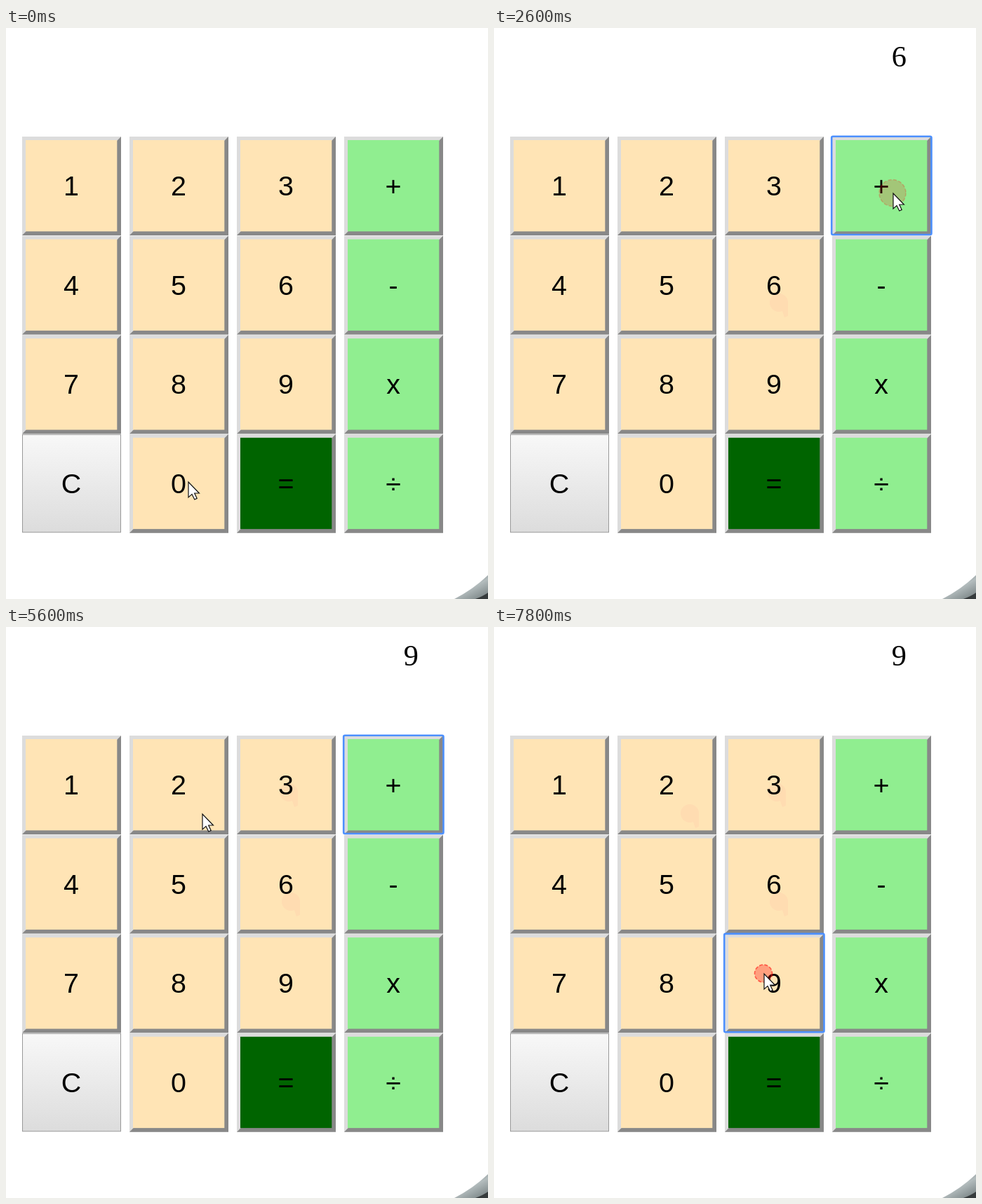
Write an HTML page that moves like this. It is 687 by 815 pixels and loops after 8 s.

```html
<!DOCTYPE html>
<html lang="en">
<head>
<meta charset="utf-8">
<title>Calculator</title>
<style>
  html, body { margin: 0; width: 100%; height: 100%; overflow: hidden; background: #fff; }
  svg { display: block; width: 100vw; height: 100vh; }
  .key { font: 39.4px "Liberation Sans", Arial, sans-serif; text-anchor: middle; }
  #display { font: 42.4px "Liberation Serif", "Times New Roman", serif; text-anchor: end; }
  #traces { mix-blend-mode: multiply; }
</style>
</head>
<body>
<svg viewBox="0 0 687 815">
  <defs>
    <linearGradient id="grey" x2="0" y2="1">
      <stop offset="0" stop-color="#f8f8f8"/>
      <stop offset="1" stop-color="#dcdcdc"/>
    </linearGradient>
    <linearGradient id="metal" x1=".2" y1=".2" x2=".8" y2="1">
      <stop offset="0" stop-color="#7f8a8b"/>
      <stop offset=".45" stop-color="#b3bcbd"/>
      <stop offset="1" stop-color="#7c8687"/>
    </linearGradient>
  </defs>
  <rect width="687" height="815" fill="#fff"/>
  <path d="M639 815Q666 801 687 781V815Z" fill="url(#metal)"/>
  <path d="M669 815Q680 811 687 806V815Z" fill="#363b3c"/>
  <g id="keys"></g>
  <g id="traces" fill="#fff6fa"></g>
  <rect id="ring" width="142.3" height="140.3" rx="2" fill="none" stroke="#4d90fe" stroke-width="2.6"/>
  <text id="display" x="588" y="54.5"></text>
  <circle id="pulse" fill="#f00" stroke="#f00" stroke-width="1.6" stroke-dasharray="5 2.5"/>
  <path id="cursor" d="M1 1V23L6 18.4L9.8 26L13.2 24.4L9.7 17H16.4Z" fill="#fff" stroke="#111" stroke-width="1.2"/>
</svg>
<script>
const STEP = 200, STEPS = 40;
const $ = id => document.getElementById(id);
const labels = '123+456-789xC0=÷';
const keyAt = i => ({ x: 23 + (i % 4) * 153, y: 155 + (i >> 2) * 141.6 });

function keyMarkup(label, i) {
  const { x, y } = keyAt(i), size = 141, light = 5, dark = 5.7;
  const inner = size - light - dark;
  const fill = label === '=' ? '#006400' : i % 4 === 3 ? '#90ee90' : '#ffe4b5';
  const face = label === 'C'
    ? `<rect x="${x + .5}" y="${y + .5}" width="140" height="139.5" fill="url(#grey)" stroke="#999"/>`
    : `<rect x="${x}" y="${y}" width="${size}" height="${size}" fill="#dcdcdc"/>
       <path d="M${x + size} ${y}v${size}h${-size}l${dark} ${-dark}L${x + size - dark} ${y + dark}Z" fill="#888"/>
       <rect x="${x + light}" y="${y + light}" width="${inner}" height="${inner}" fill="${fill}"/>`;
  return `${face}<text class="key" x="${x + 70}" y="${y + 84}">${label}</text>`;
}

// The hand rests at x, y from step `from` to step `to` and clicks at step `at`;
// `sag` bends the way there downwards.
const rests = [
  { from: 0, to: 0, x: 259, y: 647 },
  { from: 6, at: 7, to: 6, x: 406, y: 392, key: '6' },
  { from: 11, at: 12, to: 13, x: 568, y: 235, key: '+', sag: 8 },
  { from: 17, at: 18, to: 18, x: 403, y: 236, key: '3' },
  { from: 22, at: 24, to: 24, x: 575, y: 253, key: '+', sag: 78 },
  { from: 28, at: 30, to: 30, x: 279, y: 266, key: '2', sag: 95 },
  { from: 32, at: 33, to: 35, x: 521, y: 260, key: '+', sag: 40 },
  { from: 38, at: 39, to: 39, x: 384, y: 494, key: '9', sag: 110 }
];

// Digits show themselves, plus shows the running sum
const clicks = rests.filter(r => r.key);
let sum = 0;
for (const c of clicks) {
  if (c.key !== '+') sum += +c.key;
  c.value = c.key === '+' ? sum : c.key;
}

const ease = k => k * k * k * (10 - 15 * k + 6 * k * k);

function pointer(n) {
  const i = rests.findIndex(r => n <= r.to);
  const b = rests[i];
  if (n >= b.from) return b;
  const a = rests[i - 1], k = (n - a.to) / (b.from - a.to), e = ease(k);
  return {
    x: a.x + (b.x - a.x) * e,
    y: a.y + (b.y - a.y) * e + (b.sag || 0) * 4 * k * (1 - k)
  };
}

const show = (el, on) => el.setAttribute('visibility', on ? 'visible' : 'hidden');
const set = (el, attrs) => Object.entries(attrs).forEach(([k, v]) => el.setAttribute(k, v));

$('keys').innerHTML = [...labels].map(keyMarkup).join('');

// Clicks on digits leave a faint stain
const stained = clicks.filter(c => c.key !== '+');
$('traces').innerHTML = stained.map(c =>
  `<path transform="translate(${c.x} ${c.y})" d="M-13 0A13 13 0 0 1 13 0V19L8 21L5 12A13 13 0 0 1-13 0Z"/>`
).join('');

function draw(n) {
  const { x, y } = pointer(n);
  set($('cursor'), { transform: `translate(${x} ${y})` });

  const focus = clicks.filter(c => c.at - 1 <= n).pop();
  show($('ring'), focus);
  if (focus) {
    const p = keyAt(labels.indexOf(focus.key));
    set($('ring'), { x: p.x - .8, y: p.y - .3 });
  }

  const last = clicks.filter(c => c.at <= n).pop();
  $('display').textContent = last ? last.value : '';

  const age = last ? n - last.at : 2;
  show($('pulse'), age < 2);
  if (age < 2) {
    set($('pulse'), {
      cx: last.x, cy: last.y + .5, r: 12.5 + 6.5 * age,
      'fill-opacity': .3 - .13 * age,
      'stroke-opacity': .55 - .33 * age
    });
  }
  [...$('traces').children].forEach((el, i) => show(el, n > stained[i].at));
}

const start = performance.now();
function tick() {
  draw(Math.floor((performance.now() - start) / STEP) % STEPS);
  requestAnimationFrame(tick);
}
tick();
</script>
</body>
</html>
```
